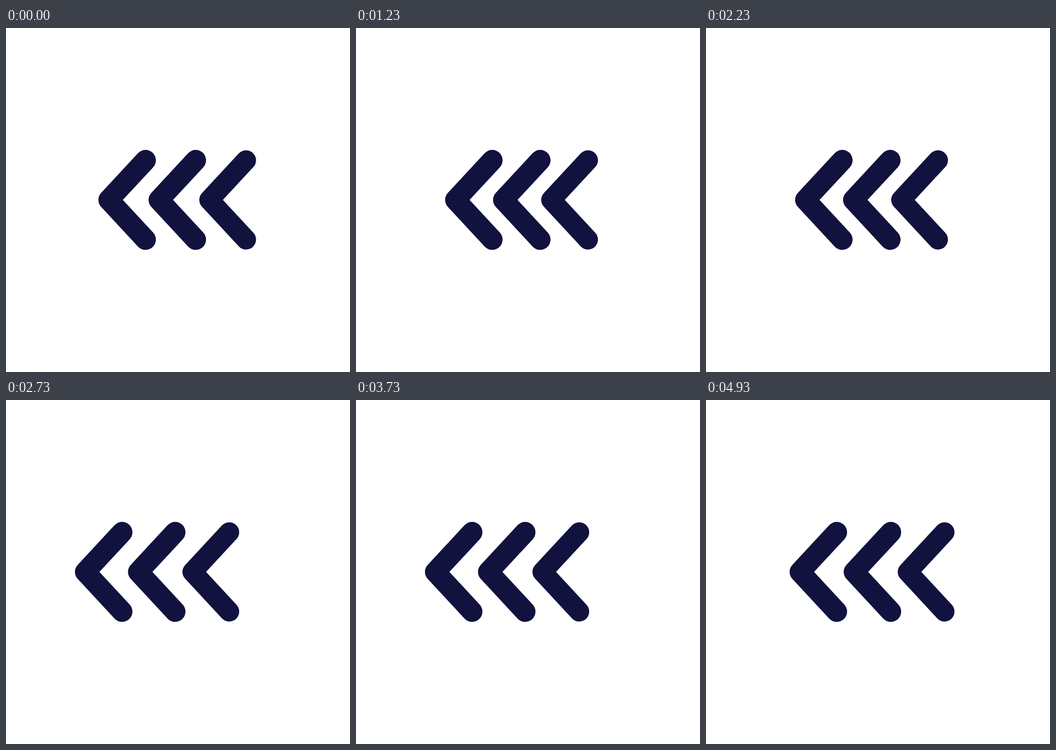
Animation of 748 by 748 pixels, one loop 5.01 s. Source, as an HTML page with a canvas:

```html
<!DOCTYPE html>
<html lang="en">
<head>
<meta charset="utf-8">
<title>Chevrons</title>
<style>
  html, body { margin: 0; width: 100%; height: 100%; overflow: hidden; background: #fff; }
  canvas { display: block; }
</style>
</head>
<body>
<canvas id="stage" width="748" height="748"></canvas>
<script>
const ctx = document.getElementById('stage').getContext('2d');
const LOOP = 5010;
const CYCLE = 30;   // ticks per swing, 30 ticks a second
const TRAVEL = 60.4;
const MID_Y = 373.8;
const ARM = { x: 80, y: 86.2 };

// x: resting vertex; the ticks mark leaving, the far point and the return
const chevrons = [
  { x: 223.4, width: 45, leave: 4, far: 18, back: 34 },
  { x: 332.5, width: 45, leave: 3, far: 17, back: 32 },
  { x: 442, width: 43.4, leave: 2, far: 16, back: 30 }
];

function ease(from, to, tick) {
  const s = Math.min(1, Math.max(0, (tick - from) / (to - from)));
  return s * s * (3 - 2 * s);
}

// Two ticks are shown in every 100 ms: one at 0, one at 30
function tickAt(ms) {
  const t = Math.min(ms, 4999);
  const tick = Math.floor(t / 100) * 3 + (t % 100 >= 30 ? 1 : 0);
  return tick % CYCLE;
}

function drawChevron({ x, width, leave, far, back }, tick) {
  const shift = TRAVEL * (ease(leave, far, tick) - ease(far, back, tick));
  const vertex = x - shift;
  ctx.lineWidth = width;
  ctx.beginPath();
  ctx.moveTo(vertex + ARM.x, MID_Y - ARM.y);
  ctx.lineTo(vertex, MID_Y);
  ctx.lineTo(vertex + ARM.x, MID_Y + ARM.y);
  ctx.stroke();
}

function draw(ms) {
  ctx.fillStyle = '#fff';
  ctx.fillRect(0, 0, 748, 748);
  ctx.strokeStyle = '#11123e';
  ctx.lineCap = ctx.lineJoin = 'round';
  const tick = tickAt(ms);
  chevrons.forEach(c => drawChevron(c, tick));
}

const start = performance.now();
function loop() {
  draw((performance.now() - start) % LOOP);
  requestAnimationFrame(loop);
}
loop();
</script>
</body>
</html>
```
